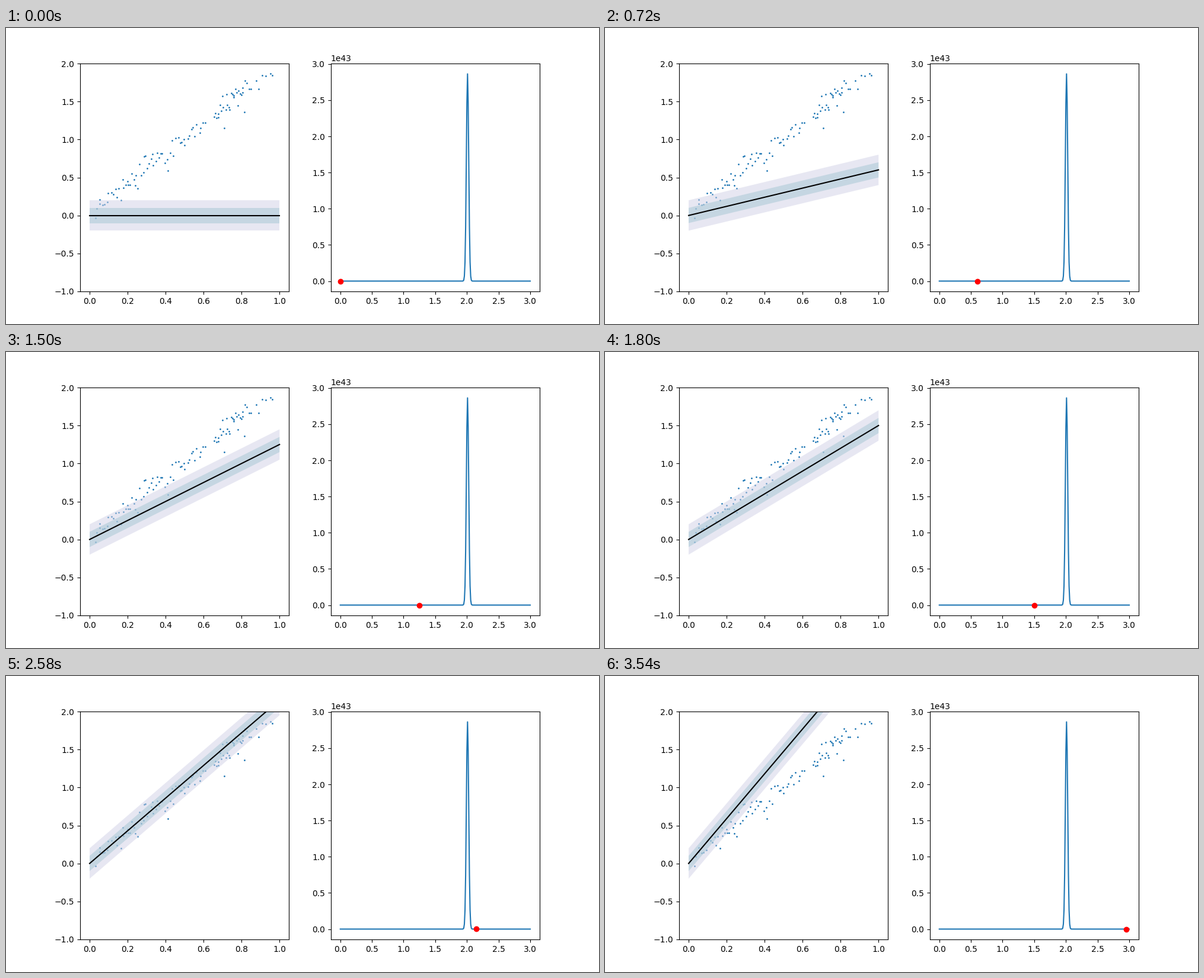
Write a matplotlib script that moves like this. It is 1000 px wide and 500 px high and loops after 3600 ms.

```python
import numpy as np
import matplotlib.pyplot as plt
from matplotlib.animation import FuncAnimation

FRAMES, INTERVAL, SLOPE_STEP = 60, 60, 0.05
SAMPLES, TRUE_SLOPE, NOISE = 100, 2.0, 0.09
PEAK, MEAN, SIGMA = 2.864e43, 2.01, 0.0183


def make_samples():
    """Noisy points on a line, with x drawn from a piecewise-linear quantile curve."""
    rng = np.random.default_rng(4)
    ranks = (np.arange(SAMPLES) + rng.random(SAMPLES)) / SAMPLES
    x = np.interp(ranks, [0, 0.12, 0.36, 0.62, 0.63, 0.92, 1],
                  [0.02, 0.15, 0.35, 0.61, 0.66, 0.83, 0.97])
    return x, TRUE_SLOPE * x + rng.normal(0, NOISE, SAMPLES)


def likelihood(slope):
    return PEAK * np.exp(-0.5 * ((slope - MEAN) / SIGMA) ** 2)


def band_corners(slope, half_width):
    return [(0, -half_width), (1, slope - half_width),
            (1, slope + half_width), (0, half_width)]


plt.rcParams["font.family"] = "DejaVu Sans"
fig, (fit_ax, like_ax) = plt.subplots(1, 2, figsize=(10, 5), dpi=100)

fit_ax.scatter(*make_samples(), s=1, color="C0", zorder=0.9)
bands = []
for half_width, color in [(0.2, "#d0d1e6"), (0.1, "#a4c6d3")]:
    patch, = fit_ax.fill(*zip(*band_corners(0, half_width)),
                         color=color, alpha=0.5, linewidth=0)
    bands.append((patch, half_width))
fit_line, = fit_ax.plot([0, 1], [0, 0], color="black")
fit_ax.set(xlim=(-0.05, 1.05), ylim=(-1, 2))

grid = np.linspace(0, 3, 301)
like_ax.plot(grid, likelihood(grid), color="C0")
like_ax.set(xlim=(-0.15, 3.15), ylim=(-0.05 * PEAK, 1.05 * PEAK))
marker, = like_ax.plot([0], [0], "ro")


def update(frame):
    slope = frame * SLOPE_STEP
    for patch, half_width in bands:
        patch.set_xy(band_corners(slope, half_width))
    fit_line.set_ydata([0, slope])
    marker.set_data([slope], [likelihood(slope)])
    return [patch for patch, _ in bands] + [fit_line, marker]


anim = FuncAnimation(fig, update, frames=FRAMES, interval=INTERVAL,
                     repeat=True, repeat_delay=0)
plt.show()
```
